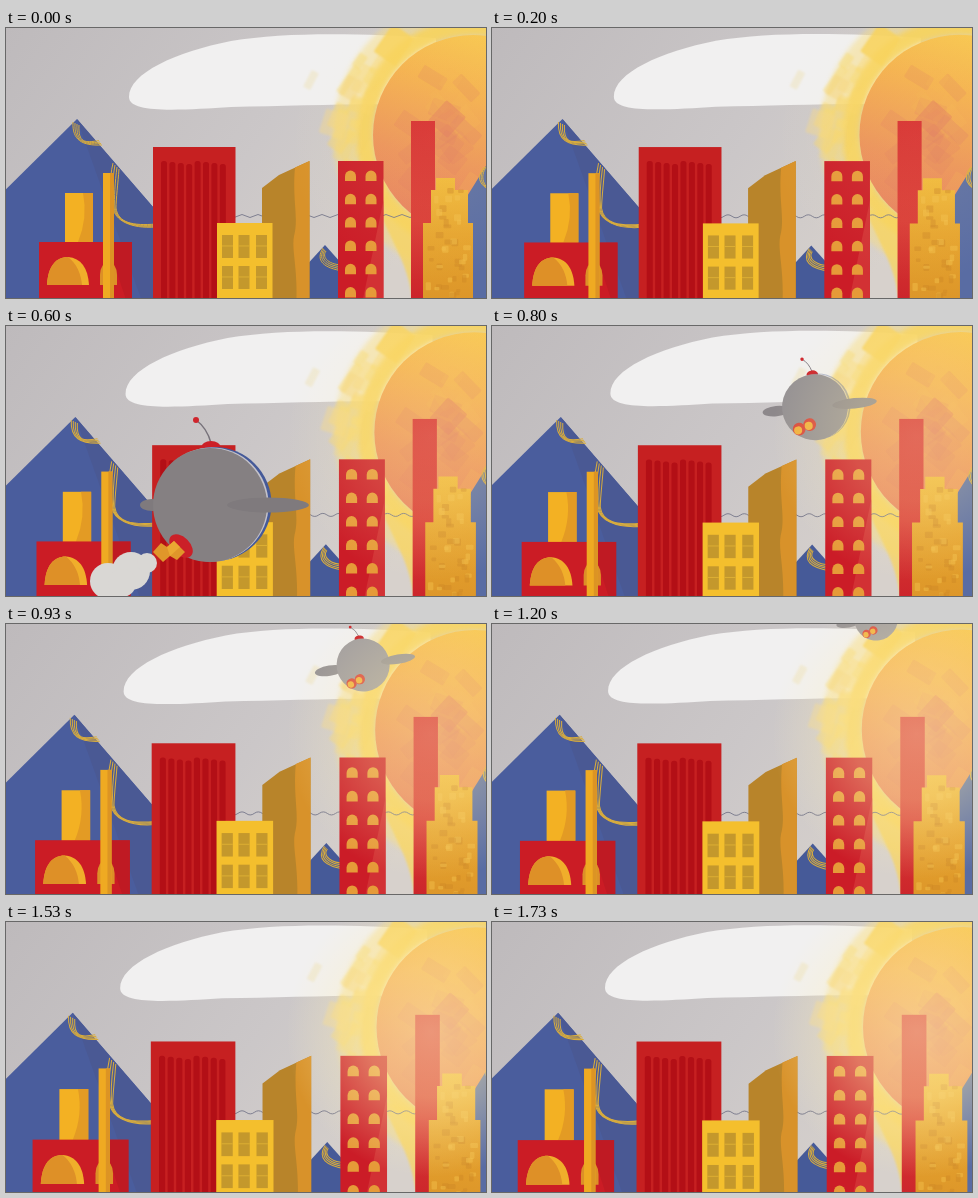
Write an HTML page that moves like this. It is 480 by 270 pixels and loops after 1790 ms.

```html
<!DOCTYPE html>
<html lang="en">
<head>
<meta charset="utf-8">
<title>City and flying ship</title>
<style>
html, body { margin: 0; width: 100%; height: 100%; overflow: hidden; background: #c5c2c3; }
svg { display: block; width: 100vw; height: 100vh; }
</style>
</head>
<body>
<svg id="stage" viewBox="0 0 480 270" preserveAspectRatio="none">
  <defs>
    <linearGradient id="sky" x2="1" y2=".4">
      <stop stop-color="#bebabc"/><stop offset=".6" stop-color="#cbc7c8"/><stop offset="1" stop-color="#d7d1cc"/>
    </linearGradient>
    <linearGradient id="sunFill" x1=".6" y1="0" x2=".3" y2=".95">
      <stop stop-color="#f8c850"/><stop offset=".3" stop-color="#f4b04c"/><stop offset=".7" stop-color="#eb9058"/><stop offset="1" stop-color="#e6805e"/>
    </linearGradient>
    <radialGradient id="halo" gradientUnits="userSpaceOnUse" cx="425" cy="110" r="145">
      <stop stop-color="#fff0b8" stop-opacity=".75"/><stop offset=".45" stop-color="#ffeeae" stop-opacity=".6"/><stop offset="1" stop-color="#fff0bd" stop-opacity="0"/>
    </radialGradient>
    <linearGradient id="towerFill" x2="0" y2="1">
      <stop stop-color="#d62a2d"/><stop offset=".5" stop-color="#d93a35"/><stop offset="1" stop-color="#c81f28"/>
    </linearGradient>
    <linearGradient id="stepFill" x2="0" y2="1">
      <stop stop-color="#f0b838"/><stop offset=".4" stop-color="#e6a42e"/><stop offset="1" stop-color="#da9228"/>
    </linearGradient>
    <filter id="soft"><feGaussianBlur stdDeviation="2.5"/></filter>
    <filter id="brush"><feGaussianBlur stdDeviation="1.2"/></filter>
  </defs>
  <rect width="480" height="270" fill="url(#sky)"/>
  <g id="cloud"><path fill="#f1f0f0" d="M123 69C123 45 170 24 225 13C280 4 350 5 430 10L430 77C350 75 290 78 225 79C175 82 123 86 123 69Z"/></g>
  <g id="sun"></g>
  <g id="hills"></g>
  <g id="back"></g>
  <g id="front"></g>
  <g id="ship">
    <g id="smoke" fill="#d9d7d4"><circle cx="-102" cy="76" r="18"/><circle cx="-79" cy="66" r="19"/><circle cx="-88" cy="78" r="14"/><circle cx="-63" cy="58" r="10"/></g>
    <path d="M1-62Q-3-77-14-85" fill="none" stroke="#77727a" stroke-width="1.5"/>
    <circle cx="-14" cy="-85" r="3" fill="#cf252c"/>
    <ellipse cx="1" cy="-57" rx="10" ry="7" fill="#cc2027"/>
    <ellipse id="wingL"/>
    <g id="rim"><circle cx="4.5" cy="-1" r="57" fill="#455a99"/><circle cx="1.6" cy="-.5" r="57" fill="#c4c2ca"/></g>
    <circle id="body" r="57"/>
    <ellipse id="wingR"/>
    <g id="jet">
      <ellipse cx="-29" cy="41" rx="14" ry="9" transform="rotate(45 -29 41)" fill="#cb2028"/>
      <path d="M-57 47L-49 38L-43 42L-36 36L-25 47L-33 55L-40 51L-47 57Z" fill="#e0962a"/>
      <path d="M-43 42L-36 36L-30 42L-40 51Z" fill="#eba832"/>
    </g>
    <g id="nozzles" fill="#d9483b">
      <circle cx="-12" cy="29" r="11"/><circle cx="-31" cy="35" r="11"/>
      <g fill="#f0b13e"><circle cx="-14" cy="31" r="7"/><circle cx="-33" cy="37" r="7"/></g>
    </g>
  </g>
  <g id="glow"><circle cx="425" cy="110" r="145" fill="url(#halo)"/></g>
</svg>
<script>
const $ = id => document.getElementById(id);
const LOOP = 1790, STEP = 200 / 3;
const SUN = { x: 467, y: 107, r: 100 };

let seed = 11;
const random = () => (seed = seed * 16807 % 2147483647) / 2147483647;
const range = n => [...Array(n).keys()];
const rect = (x, y, w, h, fill, more = '') =>
  `<rect x="${x}" y="${y}" width="${w}" height="${h}" fill="${fill}" ${more}/>`;
const path = (d, fill, more = '') => `<path d="${d}" fill="${fill}" ${more}/>`;
const arch = (x, y, w, h, fill) =>
  path(`M${x} ${y}v${-h * .45}a${w / 2} ${h * .55} 0 0 1 ${w} 0v${h * .45}z`, fill);
const dab = (x, y, w, h, turn, fill, opacity) =>
  rect(-w / 2, -h / 2, w, h, fill, `rx="1.5" opacity="${opacity}" transform="translate(${x} ${y}) rotate(${turn})"`);
const threads = (n, draw) => range(n).map(i =>
  path(draw(i), 'none', 'stroke="#d9ad3d" stroke-width="1"')).join('');
const aroundSun = (angle, d) => [SUN.x + d * Math.cos(angle), SUN.y + d * Math.sin(angle)];

function sunArt() {
  const ring = (r, width, fill, opacity) =>
    `<circle cx="${SUN.x}" cy="${SUN.y}" r="${r}" fill="none" stroke="${fill}" stroke-width="${width}" opacity="${opacity}" filter="url(#soft)"/>`;
  const strokes = range(22).map(i => {
    const [x, y] = aroundSun(2.62 + i * .055, 106 + random() * 32);
    return dab(x, y, 8 + random() * 10, 12 + random() * 20, 12 + random() * 24, '#f8d768', .2 + random() * .3);
  }).join('');
  const patches = range(18).map(() => {
    const [x, y] = aroundSun(1.5 + random() * 3.1, 15 + random() * 66);
    return dab(x, y, 14 + random() * 18, 10 + random() * 18, 20 + random() * 40,
      random() < .6 ? '#dd765f' : '#f4b452', .2);
  }).join('');
  return ring(122, 36, '#f7dc80', .5) + ring(108, 18, '#f8d256', .85) +
    path('M372 180L420 195V270H406C402 236 386 215 372 180Z', '#f8d35c', 'opacity=".75" filter="url(#brush)"') +
    `<g filter="url(#brush)">${strokes}` +
    dab(388, 17, 26, 34, 35, '#f8d35b', .85) + dab(345, 60, 17, 22, 28, '#f6d680', .5) +
    dab(328, 96, 24, 25, 18, '#f5d888', .45) + dab(305, 52, 8, 19, 28, '#eedfb4', .45) + '</g>' +
    `<circle cx="${SUN.x}" cy="${SUN.y}" r="${SUN.r}" fill="url(#sunFill)"/>` + patches +
    dab(441, 91, 26, 28, 42, '#df735d', .4) + dab(460, 102, 14, 32, -48, '#e08060', .35);
}

function hillsArt() {
  return path('M200 188q4-3 8 0' + 't8 0'.repeat(25), 'none', 'stroke="#77788b" stroke-width=".9"') +
    path('M71 91L-40 201V290H243Z', '#4a5d9d') +
    path('M71 91L243 290H142Z', '#4a5994') +
    threads(4, i => `M${67 + i * 2} ${94 + i}C${66 + i * 2} ${112 + i} ${76 + i} ${118 - i} ${96 - i} ${117 - i * 1.5}`) +
    threads(4, i => `M${107 + i * 2} ${135 + i * 2}C${103 + i * 3} ${152 + i} ${104 + i * 2} ${168 + i} ${107 + i} 180` +
      `C${109 + i} ${192 + i} ${124 + i} ${201 - i} 150 ${199 - i}`) +
    path('M319 217L285 254V290H352V254Z', '#465a98') +
    threads(4, i => `M${317 + i} ${220 + i}C${309 + i * 2} ${233 - i} ${318 + i * 2} ${240 - i} 337 ${243 - i * 2}`) +
    path('M486 128L455 178V290H500V150Z', '#596ca3') +
    threads(3, i => `M${478 + i} 139C${470 + i * 2} 149 ${472 + i * 2} 158 490 ${165 + i}`);
}

function backArt() {
  const stripes = range(8).map(i =>
    rect(155 + i * 8.4, 133 + (i * 5) % 4, 6, 160, '#b30f16', 'rx="2.5"')).join('');
  const windows = range(6).map(row => [339, 359.5].map(x =>
    arch(x, 153 + row * 23.3, 11, 10.5, '#e69a38')).join('')).join('');
  return rect(147, 119, 82.5, 180, '#c62021') + stripes +
    path('M256 160L273 147L303.5 133V290H256Z', '#b8842a') +
    path('M289 139.5L303.5 133V290H289C294 246 285 224 288 208C293 190 286 172 289 139.5Z', '#d8922a') +
    rect(405, 93, 24, 200, 'url(#towerFill)') +
    rect(332, 133, 45.5, 160, '#cb1c27') +
    path('M377.5 172L353 290H377.5Z', '#d63c3b', 'opacity=".65"') + windows;
}

function frontArt() {
  const panes = [216, 232.5, 250].map(x => [207, 238].map(y =>
    rect(x, y, 11, 23, '#c4982c') + path(`M${x} ${y + 11}h11`, 'none', 'stroke="#dcae32"')).join('')).join('');
  const bricks = range(40).map(() => {
    const y = 160 + random() * 108, wide = y > 194;
    return rect((wide ? 419 : 428) + random() * (wide ? 40 : 26), y, 4 + random() * 4,
      3 + random() * 5, random() < .6 ? '#d08a26' : '#f2bd48', 'rx="1" opacity=".5"');
  }).join('');
  return rect(59, 165, 28, 60, '#f3b123') + path('M77 165H87V214H72Q82 190 77 165Z', '#e39b24') +
    rect(33, 214, 93, 80, '#cb1c25') + path('M101 214H126V290H126Z', '#b81922', 'opacity=".6"') +
    path('M41 257C42 238 50 229 62 229C75 230 82 240 83 257Z', '#f0ae2b') +
    path('M41 257C42 238 50 229 62 229C71 236 75 246 76 257Z', '#de9027') +
    arch(94, 257, 17, 23, '#dc9027') +
    rect(97, 145, 11, 150, '#efaa22') + rect(104, 145, 4, 150, '#dc9424') +
    rect(211, 195, 55.5, 100, '#f4bf2d') + panes +
    path('M417 290V195H425V162H430V150H449V162H462V195H467V290Z', 'url(#stepFill)') + bricks;
}

$('sun').innerHTML = sunArt();
$('hills').innerHTML = hillsArt();
$('back').innerHTML = backArt();
$('front').innerHTML = frontArt();

const clamp = v => Math.max(0, Math.min(1, v));
const mix = (a, b, p) => a + (b - a) * p;
const set = (id, attrs) => Object.entries(attrs).forEach(([k, v]) => $(id).setAttribute(k, v));
const zoom = (id, s) => set(id, { transform: `translate(235 100) scale(${s}) translate(-235 -100)` });

// The ship recedes along a decelerating path towards the upper right.
function drawShip(k) {
  const n = k - 9, p = clamp(n / 5);
  const x = 394 - 190 * Math.exp(-.328 * n);
  const y = -46 + 225 * Math.exp(-.19 * n);
  const r = 20.7 + 37.3 * Math.exp(-.356 * n);
  set('ship', {
    display: k > 6 && k < 21 ? 'inline' : 'none',
    transform: `translate(${x} ${y}) rotate(${-9.5 * p}) scale(${r / 58})`
  });
  const metal = `hsl(330 2% ${mix(51, 62, p)}%)`;
  const wing = `hsl(330 2% ${mix(49, 58, p)}%)`;
  set('body', { fill: metal });
  set('wingL', { cx: mix(-58, -73, p), rx: mix(12, 32, p), cy: 0, ry: mix(6, 11, p), fill: wing });
  set('wingR', { cx: mix(58, 76, p), rx: mix(41, 37, p), cy: 0, ry: mix(7.5, 10, p), fill: wing });
  set('rim', { opacity: 1 - p });
  set('smoke', { opacity: clamp((12 - k) / 2) });
  set('jet', { opacity: p < .6 ? 1 : 0, transform: `translate(${20 * p} ${-8 * p})` });
  set('nozzles', { opacity: p < .6 ? 0 : 1 });
}

function draw(time) {
  const k = Math.min(26, Math.floor((time + 3.4) / STEP)), u = k / 26;
  set('cloud', { transform: `translate(${-10 * u} ${-3 * u})` });
  set('sun', { transform: `translate(${4 * u} ${-2 * u})` });
  zoom('hills', 1 + .03 * u);
  zoom('back', 1 + .028 * u);
  zoom('front', 1 + .036 * u);
  drawShip(k);
  set('glow', { opacity: mix(.12, .72, clamp((k - 3) / 18)) });
}

const start = performance.now();
function tick() {
  draw((performance.now() - start) % LOOP);
  requestAnimationFrame(tick);
}
tick();
</script>
</body>
</html>
```
